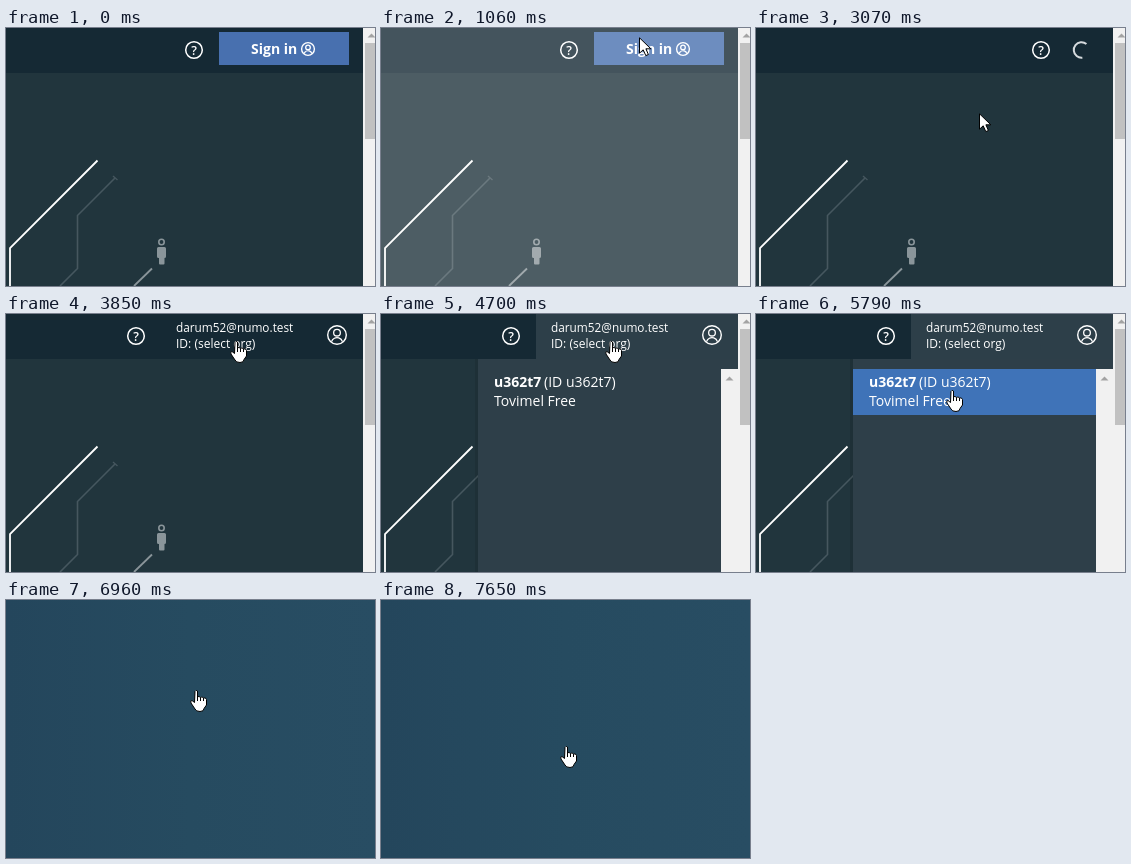
These frames come from a looping animation (369x258 px, 7800 ms). An HTML page with a canvas:

```html
<!DOCTYPE html>
<html lang="en">
<head>
<meta charset="utf-8">
<style>
html, body { margin: 0; height: 100%; overflow: hidden; }
canvas { display: block; }
</style>
</head>
<body>
<canvas id="stage" width="369" height="258"></canvas>
<script>
const c = document.getElementById('stage').getContext('2d');
const LOOP = 7800;

const ARROW = new Path2D('M.5 .8V16.2L4.2 12.8L6.8 18.6L9.4 17.5L6.9 11.8H11.8Z');
const HAND = new Path2D('M-1 1.5Q0 -.5 1.5 1V7Q3 5.5 4.5 7.5Q6 6 7.5 8Q9.5 7 10.5 9.5V15L8 18.5Q8 21.5 4 21.5Q0 21.5 -1 19L-5 13Q-6 10.5 -4 10.5L-1.5 12.5Z');
const KNUCKLES = new Path2D('M1.5 7V11M4.5 7.5V11M7.5 8V11');

// Cursor legs: start, end, number of steps, destination
const LEGS = [
  [130, 510, 6, 258, 9],
  [1510, 2140, 9, 223, 85],
  [3300, 3850, 8, 230, 27],
  [5400, 5860, 7, 190, 84],
  [6960, 7650, 10, 185, 146]
];
const CLICKS = [[740, 910], [4400, 4550], [6260, 6410]];

const within = (t, a, b) => t >= a && t < b;

function rect(color, x, y, w, h) {
  c.fillStyle = color;
  c.fillRect(x, y, w, h);
}

function line(color, width, ...points) {
  c.strokeStyle = color;
  c.lineWidth = width;
  c.beginPath();
  points.forEach(p => c.lineTo(...p));
  c.stroke();
}

function arc(x, y, r, width, color = '#fff', from = 0, to = 2 * Math.PI) {
  c.strokeStyle = color;
  c.lineWidth = width;
  c.beginPath();
  c.arc(x, y, r, from, to);
  c.stroke();
}

function text(str, x, y, size, weight = 400) {
  c.font = `${weight} ${size}px "Open Sans", sans-serif`;
  c.fillStyle = '#fff';
  c.fillText(str, x, y);
}

function upArrow(x, y) {
  c.fillStyle = '#a3a3a3';
  c.beginPath();
  c.moveTo(x - 4, y + 2);
  c.lineTo(x, y - 2);
  c.lineTo(x + 4, y + 2);
  c.fill();
}

function helpIcon(x) {
  arc(x, 22, 8.3, 1.5);
  c.textAlign = 'center';
  text('?', x, 26.5, 12.5, 600);
  c.textAlign = 'left';
}

function userIcon(x, y, r) {
  arc(x, y, r, 1.4);
  arc(x, y - r * .25, r * .36, 1.3);
  arc(x, y + r * .9, r * .62, 1.3, '#fff', Math.PI * 1.1, Math.PI * 1.9);
}

function hero() {
  line('#46575f', 1.6, [54, 258], [71.5, 240.5], [71.5, 187.5], [109, 150]);
  line('#46575f', 1.4, [107, 148], [111.5, 152]);
  line('#fff', 1.8, [4, 258], [4, 220], [91.5, 132.5]);
  line('#8a959a', 1.8, [128, 258], [146, 240.5]);
  arc(155.5, 214, 2.7, 1.6, '#8a959a');
  c.fillStyle = '#8a959a';
  c.beginPath();
  c.roundRect(151, 219, 9, 11, 1.5);
  c.roundRect(153, 228, 5.5, 8.5, 1);
  c.fill();
}

function menu(t) {
  c.globalAlpha = Math.min(1, (t - 4400) / 300);
  rect('#2d3f49', 155, 0, 202, 45);
  rect('rgba(0,0,0,.1)', 94, 45, 3, 213);
  rect('#2e3f49', 97, 45, 260, 213);
  if (t >= 5630) rect('#3f73b8', 97, 55, 243, 46);
  rect('#f1f1f1', 340, 55, 17, 203);
  upArrow(348.5, 64.5);
  text('u362t7', 113, 73, 14, 700);
  text('(ID u362t7)', 163, 73, 14);
  text('Tovimel Free', 113, 92, 14);
  c.globalAlpha = 1;
}

function account() {
  helpIcon(130);
  text('darum52@numo.test', 170, 18, 11.8);
  text('ID: (select org)', 170, 34, 12);
  userIcon(331, 21, 9.3);
}

function header(t) {
  if (t < 2440) {
    rect('#4870af', 213, 4, 130, 33);
    helpIcon(188);
    text('Sign in', 245, 26, 14, 700);
    userIcon(302, 21, 6.4);
  } else if (t < 3300) {
    const turn = (t - 3070) / 750 * 2 * Math.PI;
    helpIcon(285);
    arc(325.5, 22, 7.7, 2, '#d5dadd', turn + 1.45, turn + 5.4);
  } else {
    account();
  }
}

function page(t) {
  const loading = within(t, 2440, 2590);
  rect('#21353d', 0, 0, 369, 258);
  rect('#152934', 0, 0, 369, 45);
  if (!loading) hero();
  if (t >= 4400) menu(t);
  header(t);
  if (within(t, 1060, 2440) || t >= 6410) {
    rect('rgba(255,255,255,.2)', 0, 0, 357, 258);
    // The menu's scrollbar stays bright under the veil
  }
  if (loading) return;
  rect('#f1f1f1', 357, 0, 12, 258);
  rect('#c1c1c1', 359, 15, 10, 96);
  upArrow(365.5, 7.5);
}

function blank() {
  const g = c.createLinearGradient(0, 0, 369, 0);
  g.addColorStop(0, '#24465c');
  g.addColorStop(.5, '#264b60');
  g.addColorStop(1, '#284d63');
  rect(g, 0, 0, 369, 258);
}

function cursorAt(t) {
  let x = 197, y = 143;
  for (const [start, end, steps, toX, toY] of LEGS) {
    if (t < start) break;
    const k = Math.floor((t - start) / (end - start) * (steps - 1)) + 1;
    const p = Math.min(1, k / steps);
    x += (toX - x) * p;
    y += (toY - y) * p;
  }
  return [Math.round(x), Math.round(y)];
}

function cursor(t) {
  if (t < 130) return;
  const [x, y] = cursorAt(t);
  const hand = t > 3300 && y < 45 || t >= 5400;
  const shape = hand ? HAND : ARROW;
  c.save();
  c.translate(x, y);
  if (CLICKS.some(([a, b]) => within(t, a, b))) {
    c.fillStyle = 'rgba(255,255,0,.47)';
    c.beginPath();
    c.arc(0, 0, 12, 0, 2 * Math.PI);
    c.fill();
  }
  c.fillStyle = '#fff';
  c.strokeStyle = '#000';
  c.lineWidth = 1;
  c.fill(shape);
  c.stroke(shape);
  if (hand) c.stroke(KNUCKLES);
  c.restore();
}

const origin = performance.now();

function draw() {
  const t = (performance.now() - origin) % LOOP;
  if (t < 6560) page(t);
  else blank();
  cursor(t);
  requestAnimationFrame(draw);
}
draw();
</script>
</body>
</html>
```
